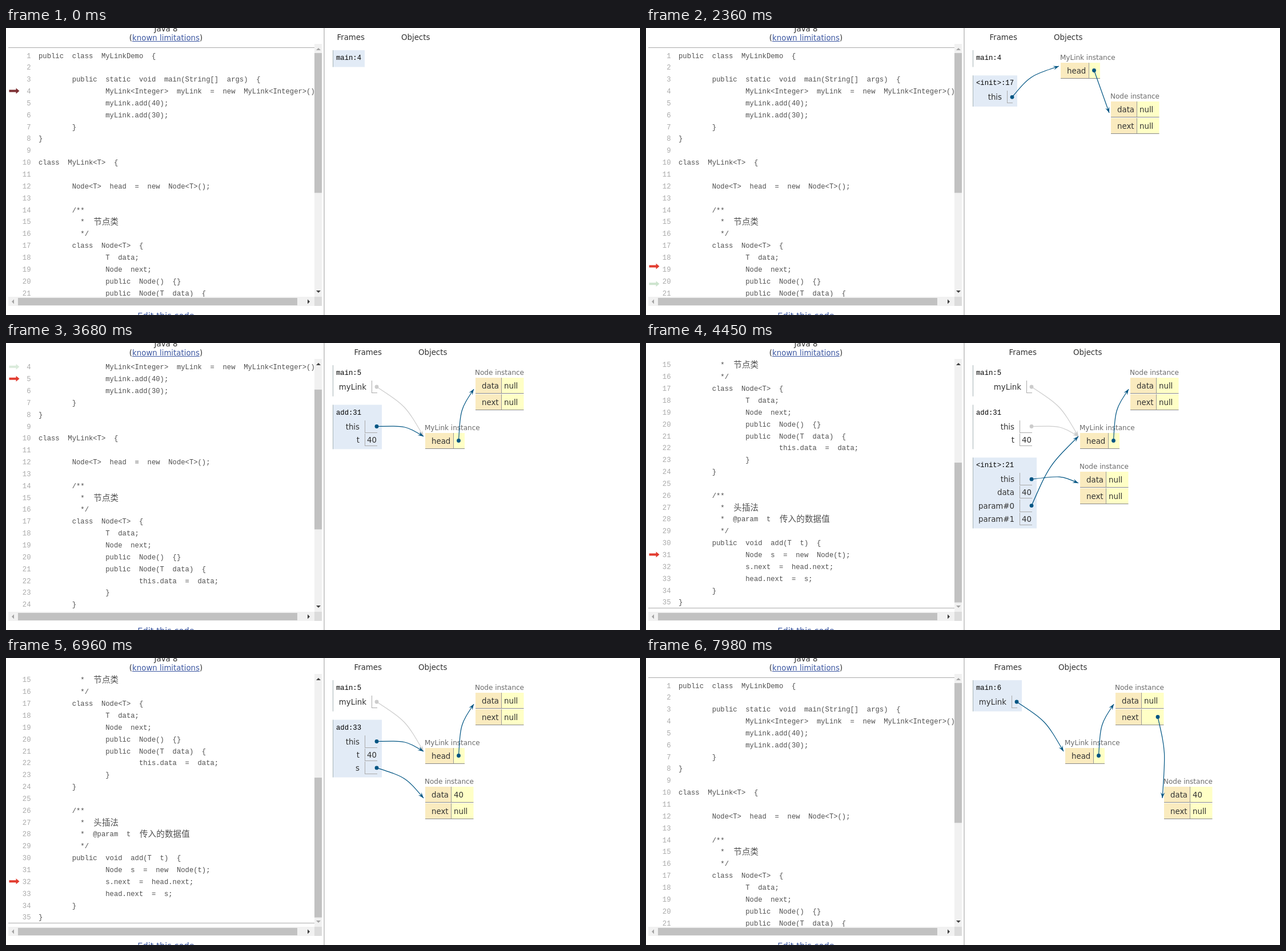
These frames come from a looping animation (1110 by 504 pixels, 8000 ms). An HTML page with a canvas:

```html
<!DOCTYPE html>
<html lang="en">
<head>
<meta charset="utf-8">
<title>Linked list visualisation</title>
<style>
html, body { margin: 0; width: 100%; height: 100%; overflow: hidden; background: #fff; }
canvas { display: block; }
</style>
</head>
<body>
<canvas id="stage" width="1110" height="504"></canvas>
<script>
const ctx = document.getElementById('stage').getContext('2d');
const LOOP = 8000, CHAR = 7.33, LINE = 20.85, MAX_SCROLL = 302;
const SANS = '"DejaVu Sans", sans-serif';
const BLUE = '#005583', TEXT = '#333', RED = '#e23c30';

const code = `public class MyLinkDemo {

    public static void main(String[] args) {
        MyLink<Integer> myLink = new MyLink<Integer>();
        myLink.add(40);
        myLink.add(30);
    }
}

class MyLink<T> {

    Node<T> head = new Node<T>();

    /**
     * 节点类
     */
    class Node<T> {
        T data;
        Node next;
        public Node() {}
        public Node(T data) {
            this.data = data;
        }
    }

    /**
     * 头插法
     * @param t 传入的数据值
     */
    public void add(T t) {
        Node s = new Node(t);
        s.next = head.next;
        head.next = s;
    }
}`.split('\n').map(s => s.replace(/ /g, '  '));

// Heap objects: M is the list, A the head node, B the inserted node.
// A value starting with ">" is a pointer to the named object.
const list = (y, head) => ({ id: 'M', type: 'MyLink', dx: 76, y, nameW: 49, rows: [['head', head]] });
const node = (id, dx, y, data = 'null', next = 'null') =>
  ({ id, type: 'Node', dx, y, nameW: 45, rows: [['data', data], ['next', next]] });

const bare = [list(61, 'null')];
const building = [list(61, 'null'), node('A', 76, 129)];
const linked = [list(61, '>A'), node('A', 164, 129)];
const base = [list(158, '>A'), node('A', 164, 61)];
const fresh = [...base, node('B', 76, 226)];
const filled = [...base, node('B', 76, 226, '40')];
const joined = [list(158, '>A'), node('A', 164, 61, 'null', '>B'), node('B', 249, 226, '40')];

const main4 = ['main:4'];
const main = n => ['main:' + n, ['myLink', '>M']];
const ctor = n => ['<init>:' + n, ['this', '>M']];
const inner = n => ['<init>:' + n, ['this', '>A'], ['param#0', '>M']];
const innerData = n => ['<init>:' + n, ['this', '>B'], ['data', '40'], ['param#0', '>M'], ['param#1', '40']];
const add = n => ['add:' + n, ['this', '>M'], ['t', '40']];
const addS = n => [...add(n), ['s', '>B']];
const ret = ['Return', 'void'];

// at: start time, line: next line, back: the step returns, prev: line just run
const steps = [
  { at: -1000, line: 4, stack: [main4], heap: [] },
  { at: 470, line: 10, stack: [main4, ctor(10)], heap: bare },
  { at: 985, line: 12, stack: [main4, ctor(12)], heap: bare },
  { at: 1240, line: 20, stack: [main4, ctor(12), inner(20)], heap: building },
  { at: 1790, line: 20, back: 1, stack: [main4, ctor(12), [...inner(20), ret]], heap: building },
  { at: 2040, line: 17, stack: [main4, ctor(17)], heap: linked },
  { at: 2520, line: 17, back: 1, stack: [main4, [...ctor(17), ret]], heap: linked },
  { at: 2980, line: 5, prev: 4, stack: [main(5)], heap: base },
  { at: 3600, line: 31, stack: [main(5), add(31)], heap: base },
  { at: 4440, line: 21, stack: [main(5), add(31), innerData(21)], heap: fresh },
  { at: 5140, line: 22, stack: [main(5), add(31), innerData(22)], heap: fresh },
  { at: 5640, line: 23, back: 1, stack: [main(5), add(31), [...innerData(23), ret]], heap: filled },
  { at: 6190, line: 32, prev: 31, stack: [main(5), addS(32)], heap: filled },
  { at: 6770, line: 33, stack: [main(5), addS(33)], heap: filled },
  { at: 7320, line: 34, back: 1, stack: [main(5), [...addS(34), ret]], heap: joined },
  { at: 7765, line: 6, stack: [main(6)], heap: joined },
];

const lineY = n => 48 + (n - 1) * LINE;
steps.forEach((s, i) => {
  s.y = lineY(s.line) + (s.back ? 5 : 0);
  s.prevY = s.prev ? lineY(s.prev) : i ? steps[i - 1].y : null;
});

const clamp = (v, lo, hi) => Math.min(hi, Math.max(lo, v));
const cubic = p => p < .5 ? 4 * p ** 3 : 1 - 4 * (1 - p) ** 3;
const swing = p => .5 - Math.cos(Math.PI * clamp(p, 0, 1)) / 2;

function rect(x, y, w, h, color) {
  ctx.fillStyle = color;
  ctx.fillRect(x, y, w, h);
}

function poly(points, color) {
  ctx.fillStyle = color;
  ctx.beginPath();
  points.forEach(p => ctx.lineTo(...p));
  ctx.fill();
}

function text(s, x, y, color = TEXT, size = 13.33, align = 'left') {
  ctx.font = `${size}px ${SANS}`;
  ctx.textAlign = align;
  ctx.fillStyle = color;
  ctx.fillText(s, x, y);
}

function widthOf(s, size = 13.33) {
  ctx.font = `${size}px ${SANS}`;
  return ctx.measureText(s).width;
}

// Fixed grid: a Chinese character takes two cells.
function mono(s, x, y, color) {
  ctx.textAlign = 'left';
  ctx.fillStyle = color;
  for (const c of s) {
    const wide = c > '\u2fff';
    ctx.font = wide ? '300 14.5px "Noto Sans CJK SC", "Noto Sans CJK", sans-serif'
                    : '12.22px "Liberation Mono", monospace';
    ctx.fillText(c, wide ? x + 1 : x, wide ? y + 1 : y);
    x += wide ? CHAR * 2 : CHAR;
  }
}

function link(s, x, y, size) {
  text(s, x, y, '#3d58a2', size);
  rect(x, Math.round(y + 1.5), widthOf(s, size), 1, '#3d58a2');
}

function triangle(x, y, dx, dy, on) {
  poly([[x + dx * 2, y + dy * 2], [x - dx * 2 + dy * 4, y - dy * 2 + dx * 4],
        [x - dx * 2 - dy * 4, y - dy * 2 - dx * 4]], on ? '#404040' : '#a3a3a3');
}

function lineArrow(y, color) {
  poly([[0, -2], [12, -2], [12, -5], [18, 0], [12, 5], [12, 2], [0, 2]]
    .map(([px, py]) => [px + 5.5, py + y]), color);
}

function scrollAt(t) {
  const down = clamp(406 * swing((t - 3600) / 300), 0, MAX_SCROLL);
  return Math.max(0, down - 415 * swing((t - 7765) / 300));
}

function drawCode(t) {
  const scroll = scrollAt(t);
  ctx.save();
  ctx.beginPath();
  ctx.rect(0, 28, 540, 444);
  ctx.clip();
  ctx.translate(0, -scroll);
  rect(4, 34, 536, 1, '#aaa');
  rect(4, 767, 536, 1, '#aaa');
  code.forEach((s, i) => {
    const y = lineY(i + 1) + 4.5, n = String(i + 1);
    mono(n, 43.5 - n.length * CHAR, y, '#aaa');
    mono(s, 57, y, '#505050');
  });

  const now = steps.findLast(s => t >= s.at);
  const before = steps[steps.indexOf(now) - 1];
  const age = (t - now.at) / 200;
  const prevY = age < 1 ? before && before.prevY : now.prevY;
  if (prevY != null) {
    ctx.globalAlpha = age < 1 ? 1 - cubic(age) : 1;
    lineArrow(prevY, '#cde4ce');
    ctx.globalAlpha = 1;
  }
  const i = steps.findLastIndex(s => t >= s.at + 200);
  const from = steps[Math.max(0, i - 1)].y;
  const p = cubic(clamp((t - steps[i].at - 200) / 250, 0, 1));
  lineArrow(from + (steps[i].y - from) * p, t < 470 ? '#7d3034' : RED);
  ctx.restore();

  rect(540, 28, 13, 444, '#f1f1f1');
  rect(540, 44 + scroll * .55, 13, 245.5, '#c1c1c1');
  triangle(547, 37, 0, -1, scroll > 0);
  triangle(547, 463, 0, 1, scroll < MAX_SCROLL);
  rect(4, 472, 536, 16, '#f1f1f1');
  rect(540, 472, 13, 16, '#dcdcdc');
  rect(21, 474, 489, 13, '#c1c1c1');
  triangle(12, 480.5, -1, 0, false);
  triangle(530, 480.5, 1, 0, true);
}

function connect([x, y], [tx, ty], color) {
  const up = ty < y, far = Math.hypot(tx - x, ty - y) > 80;
  const cx = (x + tx) / 2 + (far ? (up ? -10 : 10) : 0);
  const cy = (y + ty) / 2 - (far ? 10 : 0);
  ctx.strokeStyle = ctx.fillStyle = color;
  ctx.lineWidth = 1.2;
  ctx.beginPath();
  ctx.moveTo(x, y);
  ctx.bezierCurveTo(cx, cy, cx, cy, tx, ty);
  ctx.stroke();
  ctx.beginPath();
  ctx.arc(x, y, 3.4, 0, 7);
  ctx.fill();
  ctx.save();
  ctx.translate(tx, ty);
  ctx.rotate(Math.atan2(ty - cy, tx - cx));
  poly([[0, 0], [-10, 3.7], [-6, 0], [-10, -3.7]], color);
  ctx.restore();
}

const isPointer = v => v[0] === '>';
const cellWidth = v => isPointer(v) ? 10 : v === 'void' ? 33 : 22;
const labelSize = name => name === 'Return' ? 12 : 13.33;

function drawState({ stack, heap }) {
  const wires = [];
  const right = Math.round(572 + Math.max(...stack.flatMap(([title, ...vars]) => [
    title.length * CHAR + 12,
    ...vars.map(([name]) => 27.5 + widthOf(name, labelSize(name)) + Math.max(...vars.map(v => cellWidth(v[1])))),
  ])));
  text('Frames', right, 21, TEXT, 13.33, 'right');
  text('Objects', right + 64, 21);

  let top = 39;
  stack.forEach(([title, ...vars], i) => {
    const active = i === stack.length - 1;
    const height = vars.length
      ? 31.5 + vars.reduce((h, v) => h + (v === ret ? 36 : 23.2), 0) : 29.5;
    if (active) rect(572, top, right - 572, height, '#e2ebf6');
    rect(572, top, 1, height, '#a6b3b6');
    mono(title, 578, top + 17, '#000');

    const cell = right - 8 - Math.max(...vars.map(v => cellWidth(v[1])));
    vars.forEach(([name, value], k) => {
      const y = top + 38 + k * 23.2, isRet = name === 'Return';
      const bottom = Math.round(y + (isRet ? 23 : 10));
      rect(cell, Math.round(y - 11), 1, bottom - Math.round(y - 11), '#aaa');
      rect(cell, bottom, right - 8 - cell, 1, '#aaa');
      if (isRet) {
        text('Return', cell - 9, y + 4, RED, 12, 'right');
        text('value', cell - 9, y + 18, RED, 12, 'right');
      } else text(name, cell - 9, y + 5, TEXT, 13.33, 'right');
      if (isPointer(value)) wires.push([right - 9, y, value[1], active ? BLUE : '#ccc']);
      else text(value, cell + 4, y + (isRet ? 11 : 5));
    });
    top += height + 14.8;
  });

  heap.forEach(({ type, dx, y, nameW, rows }) => {
    const x = right + dx, valueX = x + nameW + 1;
    const valueW = rows.every(r => isPointer(r[1])) ? 19 : 38.5;
    text(type + ' instance', x - 1, y - 5, '#6b6b6b', 12);
    rows.forEach(([name, value], k) => {
      const ry = y + k * 29;
      rect(x, ry, nameW, 27, '#faebbf');
      rect(valueX, ry, valueW, 27, '#ffffc6');
      rect(valueX - 1, ry, 1, 27, '#999');
      rect(x, ry + 27, nameW + 1 + valueW, 1, '#888');
      text(name, x + 11, ry + 19);
      if (isPointer(value)) wires.push([valueX + valueW - 10.5, ry + 13.5, value[1], BLUE]);
      else text(value, valueX + 4, ry + 19);
    });
  });

  wires.forEach(([x, y, id, color]) => {
    const o = heap.find(h => h.id === id);
    connect([x, y], [right + o.dx - 3, o.y + (id === 'M' ? 6 : 20)], color);
  });
}

function draw(t) {
  rect(0, 0, 1110, 504, '#fff');
  text('Java 8', 280, 6, TEXT, 13.33, 'center');
  const x = 280 - widthOf('(known limitations)') / 2;
  const open = widthOf('('), label = 'known limitations';
  text('(', x, 21.5);
  link(label, x + open, 21.5, 13.33);
  text(')', x + open + widthOf(label), 21.5);
  link('Edit this code', 280 - widthOf('Edit this code', 14.6) / 2, 510, 14.6);
  rect(556, 0, 2, 504, '#ccc');
  drawCode(t);
  drawState(steps.findLast(s => t >= s.at));
}

const start = performance.now();
(function tick() {
  draw((performance.now() - start) % LOOP);
  requestAnimationFrame(tick);
})();
</script>
</body>
</html>
```
